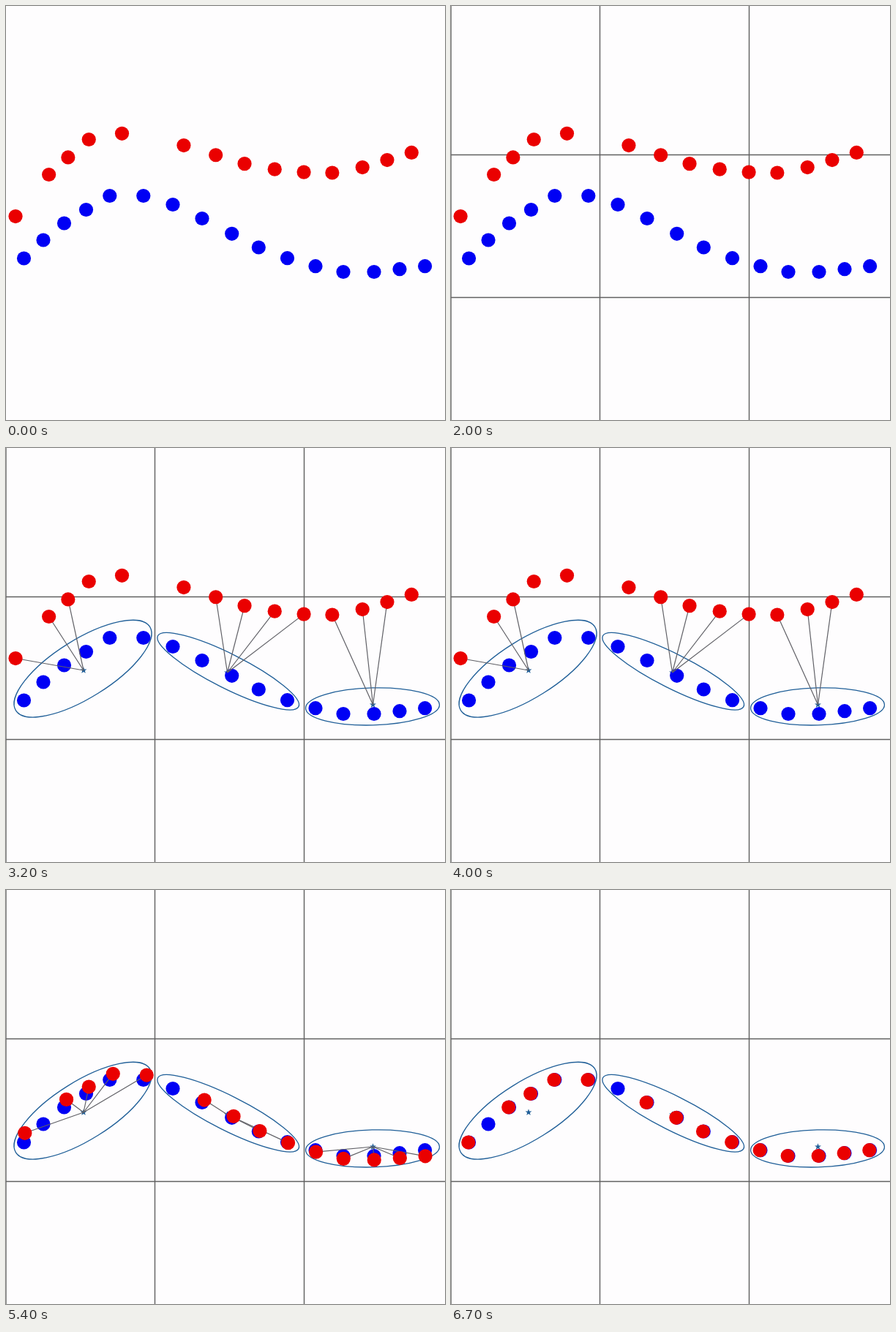
Recreate the animation shown at these times as an HTML page with a canvas. Size 600 by 566 pixels, loop 7.6 s.

```html
<!DOCTYPE html>
<html lang="en">
<head>
<meta charset="utf-8">
<title>Point set registration</title>
<style>
html, body { margin: 0; width: 100%; height: 100%; overflow: hidden; background: #fefdfe; }
canvas { display: block; }
</style>
</head>
<body>
<canvas id="stage" width="600" height="566"></canvas>
<script>
const ctx = document.getElementById('stage').getContext('2d');
const LOOP = 7600;
// Times at which each step of the algorithm appears
const T = { grid: 1000, cells: 2200, match1: 3200, move1: 4100, match2: 5100, move2: 6300 };
const COLS = [203.5, 407.5], ROWS = [203.5, 398.5];

// Reference scan; the moving scan is the same shape under a rigid motion
const blue = [[24.5, 345], [51, 320], [79.5, 297], [109.5, 278.5], [141.8, 259.5], [187.8, 259.5],
  [228, 271.5], [268, 290.5], [308.7, 311.3], [345.3, 330], [384.5, 344.7], [423, 355.7],
  [461, 363.5], [503, 363.5], [538, 359.7], [572.6, 355.7]];
const scan = blue.filter((p, i) => i !== 1 && i !== 6);

function moved(angle, dx, dy) {
  const c = Math.cos(angle), s = Math.sin(angle);
  return scan.map(([x, y]) => [x * c - y * s + dx, x * s + y * c + dy]);
}
const first = moved(-0.179, -72.5, -47.6);
const second = moved(0.038, 14.4, -13.4);
const last = moved(0, -0.8, 0);

// One ellipse per column: centre, radii, tilt in degrees, mean
const cells = [
  { c: [105, 301.7], r: [108, 39.6], tilt: -32, mean: [106, 304] },
  { c: [303.7, 305.2], r: [107.7, 23.4], tilt: 26.7, mean: [302.5, 307] },
  { c: [501, 353.4], r: [91.5, 25.5], tilt: -1.5, mean: [501.5, 351] }
];

function line(x1, y1, x2, y2) {
  ctx.beginPath();
  ctx.moveTo(x1, y1);
  ctx.lineTo(x2, y2);
  ctx.stroke();
}

function dots(points, color) {
  ctx.fillStyle = color;
  for (const [x, y] of points) {
    ctx.beginPath();
    ctx.arc(x, y, 9.6, 0, 7);
    ctx.fill();
  }
}

function star([x, y]) {
  ctx.beginPath();
  for (let i = 0; i < 10; i++) {
    const r = i % 2 ? 1.9 : 4.7, a = i * Math.PI / 5;
    ctx.lineTo(x + r * Math.sin(a), y - r * Math.cos(a));
  }
  ctx.fill();
}

function drawGrid() {
  ctx.strokeStyle = '#606060';
  ctx.lineWidth = 1.4;
  for (const x of [0, ...COLS]) line(x, 0, x, 566);
  for (const y of ROWS) line(0, y, 600, y);
}

function drawCells() {
  ctx.strokeStyle = ctx.fillStyle = '#205f98';
  ctx.lineWidth = 1.3;
  for (const { c, r, tilt, mean } of cells) {
    ctx.beginPath();
    ctx.ellipse(...c, ...r, tilt * Math.PI / 180, 0, 2 * Math.PI);
    ctx.stroke();
    star(mean);
  }
}

// Join every point of the middle row to the mean of its column
function drawLinks(points) {
  ctx.strokeStyle = '#606066';
  ctx.lineWidth = 1.2;
  for (const [x, y] of points) {
    const col = COLS.filter(edge => x > edge).length;
    if (y > ROWS[0]) line(...cells[col].mean, x, y);
  }
}

function draw(t) {
  const red = t < T.move1 ? first : t < T.move2 ? second : last;
  const linked = t >= T.match1 && t < T.move1 || t >= T.match2 && t < T.move2;
  ctx.fillStyle = '#fefdfe';
  ctx.fillRect(0, 0, 600, 566);
  if (t >= T.grid) drawGrid();
  if (t >= T.cells) drawCells();
  dots(blue, '#0000f4');
  if (linked) drawLinks(red);
  dots(red, '#ea0000');
}

const begin = performance.now();
function tick() {
  draw((performance.now() - begin) % LOOP);
  requestAnimationFrame(tick);
}
tick();
</script>
</body>
</html>
```
